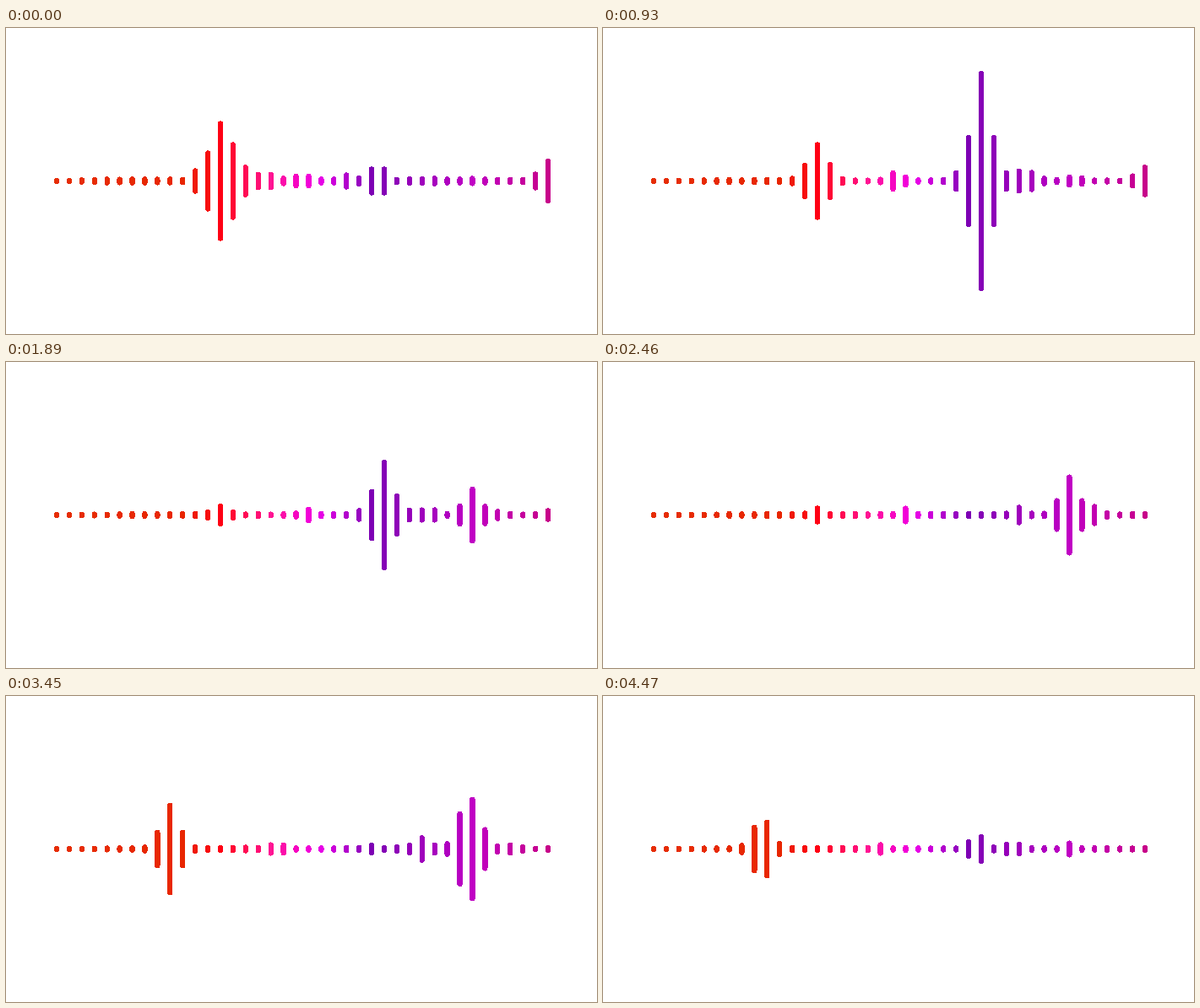
Animation, 700 px wide and 363 px high, one loop 4500 ms. Source, as an HTML page:

```html
<!DOCTYPE html>
<html lang="en">
<head>
<meta charset="utf-8">
<title>Sound bars</title>
<style>
  html, body { margin: 0; width: 100%; height: 100%; overflow: hidden; background: #fff; }
  svg { display: block; width: 100%; height: 100%; }
  line { stroke-width: 6.25; stroke-linecap: round; shape-rendering: crispEdges; }
</style>
</head>
<body>
<svg id="stage" viewBox="0 0 700 363"></svg>
<script>
const LOOP = 4500, STEP = 30, COUNT = 40, MID = 181.5, REST = 3.4, TOP = 137;
const BEAT = 270, HOMES = [9, 13, 26, 33];

// Key colours: [bar, r, g, b]
const STOPS = [
  [0, 230, 46, 6], [10, 232, 38, 0], [13, 255, 0, 20], [17, 255, 20, 147],
  [20, 242, 0, 216], [21, 230, 0, 230], [25, 125, 0, 180], [33, 192, 0, 196], [39, 199, 0, 138]
];

// Key spectra: a few peaks, each [bar, half height]; a bar may be fractional
const POSES = [
  { t: 0, quiet: 2.4, peaks: [[12, 36], [13, 71], [14, 46], [16.5, 14], [19.5, 11], [23, 10], [25.5, 22], [39, 26.5]] },
  { t: 570, quiet: 0.9, peaks: [[13, 102], [19, 16], [25.5, 22], [29.3, 46], [39, 31]] },
  { t: 1290, quiet: 1.2, peaks: [[13, 20], [19.5, 10], [26, 118], [30, 11], [33, 18], [39, 11]] },
  { t: 2460, quiet: 1.2, peaks: [[13, 11], [20, 11], [29, 12], [33, 48], [35, 13]] },
  { t: 3060, quiet: 1.4, peaks: [[8.6, 15], [18, 9], [25, 12], [27, 10]] },
  { t: 3840, quiet: 1.4, peaks: [[17.2, 13.5], [29, 24], [32.8, 136], [36, 13]] },
  { t: 4470, quiet: 1.1, peaks: [[8.6, 41], [18, 8], [25.7, 19], [28.5, 11], [33, 10]] }
];

const mix = (a, b, u) => a + (b - a) * u;
const clamp = (v, lo, hi) => Math.min(hi, Math.max(lo, v));
const skirt = d => (1 + 0.55 * d * d) ** -2;

function hash(a, b) {
  const s = Math.sin(a * 127.1 + b * 311.7) * 43758.5453;
  return s - Math.floor(s);
}

function noise(i, x) {
  const k = Math.floor(x), u = x - k;
  return mix(hash(i, k), hash(i, k + 1), u * u * (3 - 2 * u)) * 2 - 1;
}

function colour(i) {
  const k = Math.max(1, STOPS.findIndex(s => s[0] >= i));
  const a = STOPS[k - 1], b = STOPS[k], u = (i - a[0]) / (b[0] - a[0]);
  return `rgb(${[1, 2, 3].map(c => Math.round(mix(a[c], b[c], u)))})`;
}

function spectrum({ quiet, peaks }, n) {
  return Array.from({ length: COUNT }, (_, i) => {
    const floor = REST + quiet * Math.min(1, i / 7) * (0.5 + 0.8 * hash(i, n));
    return Math.max(floor, ...peaks.map(([bar, h]) => h * skirt(i - bar)));
  });
}

const levels = POSES.map(spectrum);

function heights(t) {
  const k = Math.max(0, POSES.findIndex(p => p.t >= t) - 1);
  const a = POSES[k].t, b = POSES[k + 1].t;
  const u = (t - a) / (b - a);
  const free = Math.min(1, (t - a) / 120, (b - t) / 120);

  // A seeded accent swells and fades once per beat, away from the key spectra
  const n = Math.floor(t / BEAT);
  const home = HOMES[Math.floor(hash(n, 5) * HOMES.length)];
  const swell = mix(75, 145, hash(n, 8)) * free * Math.sin(Math.PI * (t / BEAT - n)) ** 2;

  return levels[k].map((from, i) => {
    const wobble = 1 + free * (0.45 * noise(i, t / 130) - 0.1);
    const h = REST + (mix(from, levels[k + 1][i], u) - REST) * wobble;
    return clamp(Math.max(h, swell * skirt(i - home)), REST, TOP);
  });
}

const stage = document.getElementById("stage");
const bars = Array.from({ length: COUNT }, (_, i) => {
  const bar = document.createElementNS("http://www.w3.org/2000/svg", "line");
  const x = 60 + i * 582 / (COUNT - 1);
  bar.setAttribute("x1", x);
  bar.setAttribute("x2", x);
  bar.setAttribute("stroke", colour(i));
  return stage.appendChild(bar);
});

function draw(ms) {
  const t = Math.floor((ms % LOOP) / STEP) * STEP;
  heights(t).forEach((h, i) => {
    bars[i].setAttribute("y1", MID - h + 3);
    bars[i].setAttribute("y2", MID + h - 3);
  });
}

const start = performance.now();
function tick(now) {
  draw(Math.max(0, now - start));
  requestAnimationFrame(tick);
}
draw(0);
requestAnimationFrame(tick);
</script>
</body>
</html>
```
